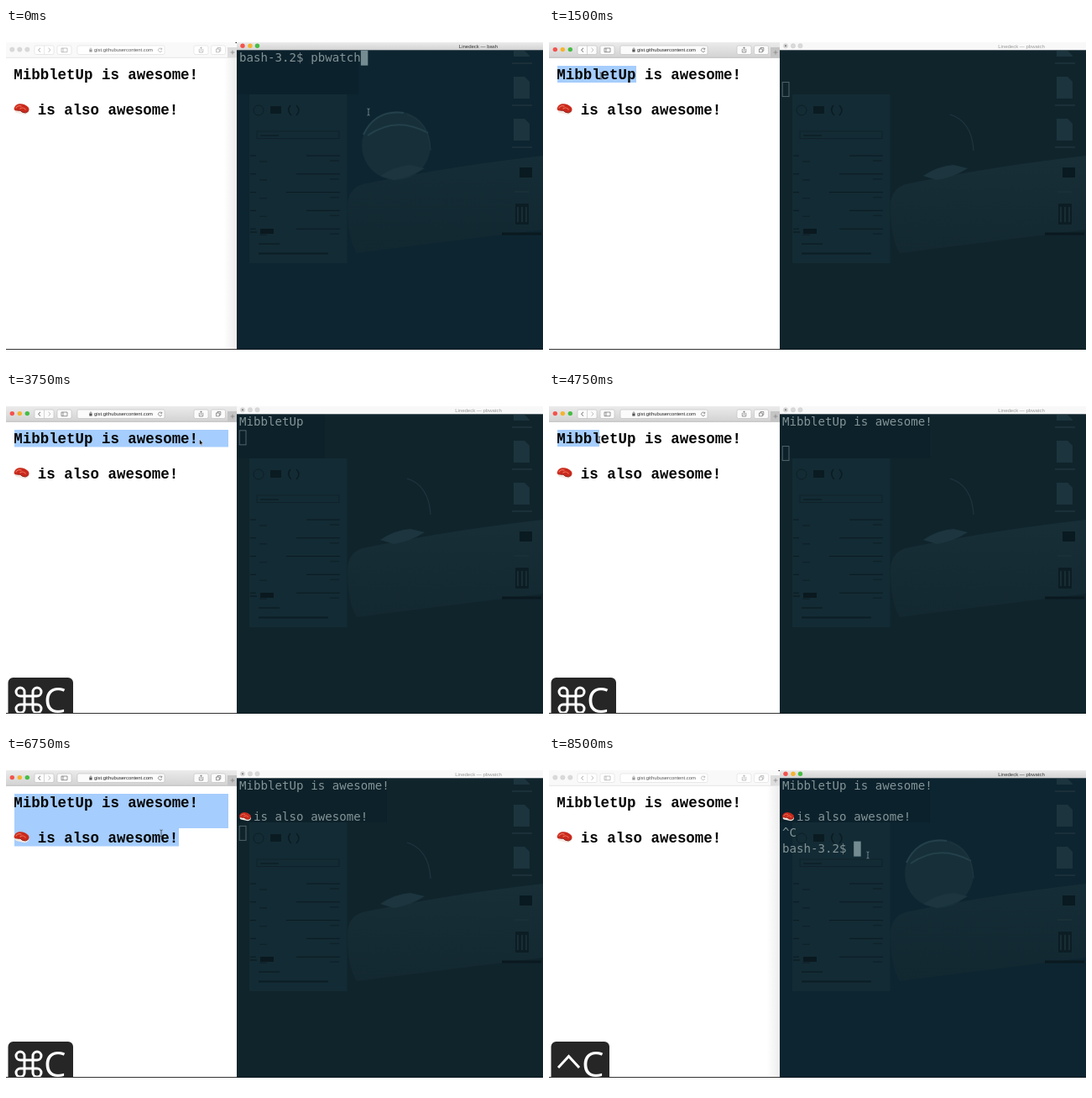
An HTML page that plays this animation: 640x400 px, repeating every 8750 ms.

```html
<!DOCTYPE html>
<html lang="en">
<head>
<meta charset="utf-8">
<title>Clipboard watcher</title>
<style>
html, body { margin: 0; width: 100%; height: 100%; overflow: hidden; background: #fff; }
svg { display: block; }
text { white-space: pre; }
.ui { font-family: "Liberation Sans", Arial, sans-serif; }
.page { font: bold 17.45px "Liberation Mono", "Courier New", monospace; fill: #050505; }
.shell { font: 14.15px "DejaVu Sans Mono", monospace; fill: #839496; }
.key { font: 42px "Open Sans", sans-serif; fill: #fff; }
</style>
</head>
<body>
<svg id="stage" width="640" height="400" viewBox="0 0 640 400">
  <defs>
    <linearGradient id="bar" x2="0" y2="1"><stop stop-color="#ebebeb"/><stop offset="1" stop-color="#d2d2d2"/></linearGradient>
    <linearGradient id="shade"><stop stop-color="#fff"/><stop offset="1" stop-color="#e4e4e4"/></linearGradient>
    <linearGradient id="hill" x2="0" y2="1"><stop stop-color="#1a323a"/><stop offset="1" stop-color="#142a32"/></linearGradient>
    <clipPath id="screen"><rect y="17" width="640" height="365.5"/></clipPath>
    <g id="sushi">
      <path d="M1 8 Q0 11 4 12 L13 14 Q18 13 18 9 L9 4Z" fill="#f3e9e1"/>
      <path d="M0 7 Q1 2 6 1 Q12 0 17 5 Q19 8 17 10 Q14 13 10 11 Q7 8 4 9 Q1 10 0 7Z" fill="#c92a1c"/>
      <path d="M2 6 Q5 2 9 4 M7 7 Q11 4 14 8" fill="none" stroke="#f0715a" stroke-width="1.1"/>
      <path d="M4 9 Q8 8 10 11 Q14 13 17 10" fill="none" stroke="#7d1510" stroke-width=".8"/>
    </g>
    <path id="ibeam" d="M-1.5 -4 Q0 -4 0 -3 V3 Q0 4 -1.5 4 M1.5 -4 Q0 -4 0 -3 M0 3 Q0 4 1.5 4" fill="none" stroke-width=".8"/>
    <path id="arrow" d="M-1.5 -4 V3 L0 1.7 L1 4 L2 3.5 L1 1.4 H3Z" fill="#111" stroke="#fff" stroke-width=".5"/>
  </defs>
  <rect width="640" height="400" fill="#fff"/>
  <g clip-path="url(#screen)">
    <g id="browser"></g>
    <g id="shell"></g>
    <g id="overlay"></g>
    <g id="mouse"></g>
  </g>
  <path d="M0 382.5 H275" stroke="#333"/>
  <path d="M275 382.5 H640" stroke="#0b1a20"/>
</svg>
<script>
const STEP = 250, STEPS = 35;
const NAME = "MibbletUp", LINE1 = NAME + " is awesome!", LINE2 = "is also awesome!";
const CHAR = 8.52, ROW = 18.75, LEFT = 278;
const $ = id => document.getElementById(id);

const rect = (x, y, w, h, fill, more = "") => `<rect x="${x}" y="${y}" width="${w}" height="${h}" fill="${fill}" ${more}/>`;
const line = (d, color, w = 1) => `<path d="${d}" fill="none" stroke="${color}" stroke-width="${w}"/>`;
const dot = (x, y, r, fill, more = "") => `<circle cx="${x}" cy="${y}" r="${r}" fill="${fill}" ${more}/>`;
const text = (x, y, cls, s, more = "") => `<text x="${x}" y="${y}" class="${cls}" ${more}>${s}</text>`;
const sushi = (x, y, k) => `<use href="#sushi" transform="translate(${x} ${y}) scale(${k})"/>`;

// Each table row: first step, value.
const mouseAt = [
  [0, 432, 100], [2, 400, 96], [3, 290, 80], [4, 150, 66], [5, 62, 57], [9, 95, 57],
  [10, 123, 57], [11, 112, 57], [12, 12, 57], [13, 120, 58], [14, 232, 60, "arrow"],
  [18, 130, 58], [19, 60, 57], [20, 120, 96], [21, 205, 98, "arrow"], [22, 214, 98, "arrow"],
  [26, 200, 95], [27, 185, 92], [28, 172, 89], [29, 168, 89], [31, 250, 95, "arrow"], [32, 375, 115], [33, 380, 118]
];
const selection = [
  [0, []], [6, [[10, 45, 94, 20]]], [12, []], [13, [[10, 45, 110, 20]]], [14, [[10, 45, 255, 20.5]]],
  [19, [[10, 45, 50, 20]]], [20, [[10, 45, 255, 41], [10, 86, 110, 21.5]]],
  [21, [[10, 45, 255, 41], [10, 86, 196, 21.5]]], [28, []]
];
// Rows of output; the last one holds the cursor.
const output = [
  [0, ["bash-3.2$ pbwatch"]], [1, ["", "", ""]], [9, [NAME, ""]], [16, [LINE1, "", ""]],
  [24, [LINE1, "", "@" + LINE2, ""]], [33, [LINE1, "", "@" + LINE2, "^C", "bash-3.2$ "]]
];
const keys = [[0, ""], [8, "cmd"], [13, ""], [14, "cmd"], [21, ""], [23, "cmd"], [28, ""], [33, "ctrl"]];

const pick = (table, n) => table.filter(row => row[0] <= n).pop();

function lights(xs, y, on) {
  const colors = ["#f4524d", "#f5b32f", "#45bd43"];
  return xs.map((x, i) => dot(x, y, 2.7, on ? colors[i] : "#d9d9d9", on ? "" : 'stroke="#c9c9c9" stroke-width=".4"')).join("");
}

function browser(active, sel) {
  const ink = active ? "#555" : "#999";
  const edge = active ? "#bdbdbd" : "#dcdcdc";
  const button = (x, w) => rect(x, 21, w, 10.5, active ? "#fbfbfb" : "#fff", `rx="1.8" stroke="${edge}" stroke-width=".6"`);
  let s = rect(0, 17, 275, 366, "#fff") + rect(0, 17, 275, 18.5, active ? "url(#bar)" : "#f9f9f9");
  s += line("M0 35.3 H275", active ? "#b5b5b5" : "#ddd", .7) + lights([7.3, 16.3, 25.3], 25.6, active);
  s += button(34, 23) + button(61, 17) + button(85, 104) + button(224, 17) + button(244.5, 17);
  s += line("M45.5 21 V31.5", edge, .6);
  s += line("M41 23.8 L38.5 26.2 L41 28.6", ink, .9) + line("M50.5 23.8 L53 26.2 L50.5 28.6", "#aaa", .8);
  s += line("M66 24 H73 V28.7 H66Z M68 24 V28.7", ink, .6);
  s += rect(99.3, 25.5, 3.3, 3, ink) + line("M100 25.5 V24.5 Q101 23 102 24.5 V25.5", ink, .6);
  s += text(105, 28.2, "ui", "gist.githubusercontent.com", `font-size="5.85" fill="${active ? "#222" : "#555"}"`);
  s += line("M185.5 25 A2.2 2.2 0 1 0 185.8 27 M185.8 23.7 V25.3 H184.2", ink, .6);
  s += line("M231 25.2 H230.3 V29 H234.7 V25.2 H234 M232.5 27.5 V23 M231.3 24 L232.5 22.8 L233.7 24", ink, .6);
  s += line("M250.5 25 H254.3 V28.8 H250.5Z M252 25 V23.5 H255.8 V27.3 H254.3", ink, .6);
  s += rect(264, 23, 11, 12.3, active ? "#c4c4c4" : "#ddd") + line("M267.5 29 H272.5 M270 26.5 V31.5", "#777", .6);
  if (!active) s += rect(260, 36, 15, 346, "url(#shade)", 'opacity=".7"') + rect(273.5, 17, 1.5, 1, "#222");
  s += sel.map(b => rect(...b, "#a5cdfd")).join("");
  return s + text(9.3, 61, "page", LINE1) + sushi(9.5, 89.3, 1) + text(37.8, 103.3, "page", LINE2);
}

function wallpaper(active) {
  let s = rect(275, 26, 365, 357, active ? "#0d2530" : "#10242c");
  s += `<path d="M407 215 Q406 192 425 186 Q520 166 640 152 V240 Q520 255 418 268 Q407 250 407 215Z" fill="url(#hill)" opacity="${active ? .6 : .75}"/>`;
  if (active) {
    s += dot(465, 140, 41, "#18323b", 'opacity=".8"') + line("M426 127 Q440 97 474 101 M431 128 Q465 104 503 125", "#24404a", 2);
  }
  s += `<path d="M446 176 Q464 164 482 163 L499 167 Q482 178 462 181Z" fill="#1c353e"/>`;
  s += line("M478 103 Q504 111 506 146", "#1d363f", 1.2);
  s += rect(290, 79, 116.5, 201, "#152d36", 'opacity=".8"');
  s += dot(301, 98, 6, "none", 'stroke="#0d1f26"') + rect(315, 93, 13, 9, "#0b1b22") + line("M339 92 Q334 98 340 104 M346 92 Q352 98 346 104", "#0b1b22", 1.6);
  s += rect(299, 123, 98, 8.5, "none", 'stroke="#0f2129" stroke-width=".8"') + line("M303 128 H325", "#0d1f26", 1.5);
  for (let y = 152, i = 0; y < 240; y += 21.8, i++) {
    s += line(`M291 ${y} H298 M${358 - i % 3 * 12} ${y} H398`, "#0b1b22", 1);
    s += line(`M302 ${y + 7} H311 M386 ${y + 6} H397`, "#0f222a", 1.4);
  }
  s += rect(303, 239, 16, 6, "#0a191f") + line("M291 243 H299 M301 257 H326", "#0d1e25", 1.5) + line("M301 268.5 H384", "#0c1e25", 1.8);
  for (const y of [30, 58, 108]) {
    const top = y === 30 ? 27 : y, end = y === 30 ? 34 : y + 26;
    s += `<path d="M605 ${top} H618 L624 ${Math.min(top + 6, end)} V${end} H605Z" fill="#1c343d"/>`;
    s += line(`M603 ${end + 8} H627`, "#1a3039", 2);
  }
  s += rect(612, 166, 15, 12, "#091a20") + line("M606 195 H623", "#1a3039", 2);
  s += rect(607, 209, 16, 25, "#0c1d24", 'rx="1"') + line("M610 213 V231 M615 213 V231 M620 213 V231", "#1d343c", 1.4);
  return s + line("M591 245 H638", "#0a191f", 3);
}

function shell(active, rows, title) {
  const last = rows.length - 1;
  let s = wallpaper(active);
  const widest = Math.max(...rows.map(r => r.length));
  if (widest) s += rect(275, 26, Math.max(105, widest * CHAR), 53, "#0a1f29", 'opacity=".5"');
  s += rect(275, 17, 365, 9.3, active ? "url(#bar)" : "#f8f8f8") + lights([282, 291, 299.5], 21.3, active);
  if (!active) s += dot(282, 21.3, 1, "#777");
  s += text(563, 23.5, "ui", "Linedeck — " + title, `font-size="6" text-anchor="middle" fill="${active ? "#333" : "#999"}"`);
  rows.forEach((r, i) => {
    const y = 39.9 + i * ROW, emoji = r[0] === "@";
    if (emoji) s += sushi(LEFT, y - 11, .78);
    s += text(LEFT + (emoji ? 2 * CHAR : 0), y, "shell", emoji ? r.slice(1) : r);
  });
  const cx = LEFT + rows[last].length * CHAR, cy = 26.6 + last * ROW;
  return s + (active ? rect(cx, cy, 8.5, 18, "#748b91")
    : rect(cx + .2, cy + .5, 7.8, 17, "none", 'stroke="#566b71" stroke-width=".9"'));
}

function overlay(kind) {
  if (!kind) return "";
  const cmd = kind === "cmd";
  let s = rect(2.5, 340, cmd ? 77.5 : 69.5, 55, "#262626", 'rx="6"');
  if (cmd) {
    const loop = (a, b) => `M${27 + a * 5} ${367 + b * 5} H${27 + a * 10} A5 5 0 1 ${a * b > 0 ? 1 : 0} ${27 + a * 5} ${367 + b * 10}Z`;
    s += line("M22 362 H32 V372 H22Z " + loop(1, 1) + loop(1, -1) + loop(-1, 1) + loop(-1, -1), "#fff", 3);
  } else {
    s += line("M11 371 L23.5 357.5 L36 371", "#fff", 3);
  }
  return s + text(cmd ? 45 : 39, 382, "key", "C");
}

function pointer([, x, y, shape = "ibeam"]) {
  const color = x > 275 ? "#8a9a9f" : "#333";
  return `<use href="#${shape}" transform="translate(${x} ${y})" stroke="${color}"/>`;
}

let shown = -1;
function draw(n) {
  const shellActive = n < 6 || n >= 32;
  $("browser").innerHTML = browser(!shellActive, pick(selection, n)[1]);
  $("shell").innerHTML = shell(shellActive, pick(output, n)[1], n < 1 ? "bash" : "pbwatch");
  $("overlay").innerHTML = overlay(pick(keys, n)[1]);
  $("mouse").innerHTML = pointer(pick(mouseAt, n));
}

const start = performance.now();
function tick() {
  const n = Math.floor((performance.now() - start) / STEP) % STEPS;
  if (n !== shown) draw(shown = n);
  requestAnimationFrame(tick);
}
tick();
</script>
</body>
</html>
```
